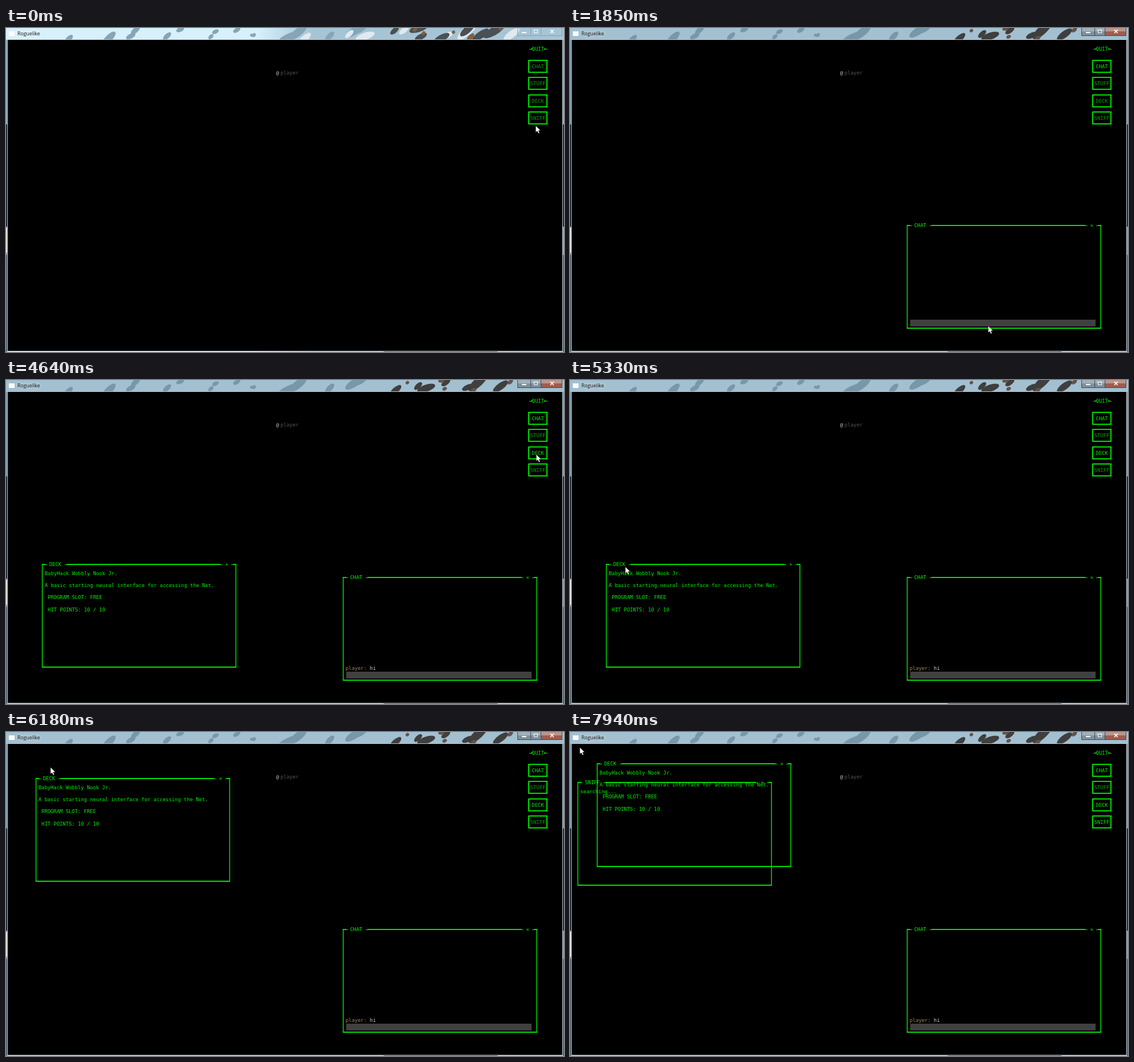
These frames come from a looping animation (981 by 571 pixels, 8 s). An HTML page with a canvas:

```html
<!DOCTYPE html>
<html lang="en">
<head>
<meta charset="utf-8">
<title>Roguelike</title>
<style>
  html, body { margin: 0; width: 100%; height: 100%; overflow: hidden; background: #000; }
  canvas { display: block; }
</style>
</head>
<body>
<canvas id="stage" width="981" height="571"></canvas>
<script>
const ctx = document.getElementById('stage').getContext('2d');
const W = 981, H = 571, LOOP = 8000, TICK = 77.05;
const CELL_W = 16 / 3, CELL_H = 32 / 3;
const GREEN = '#00e000', BRIGHT = '#00f000', DIM = '#00a400';
const MONO = '8.86px "DejaVu Sans Mono", monospace';

// Ticks at which things happen
const CHAT_OPEN = 8, TYPING = 36, SENT = 45, DECK_OPEN = 60, SNIFF_OPEN = 93;

// Moves: start tick, end tick, goal x, goal y
const pointerMoves = [
  [0, 4, 943, 67], [9, 13, 722, 575], [15, 25, 735, 524], [46, 59, 932, 131],
  [60, 68, 94, 329], [68, 72, 117, 329], [74, 76, 93, 275], [76, 80, 78, 62],
  [81, 85, 641, 124], [85, 86, 885, 314], [88, 93, 938, 155], [94, 100, 58, 11],
  [100, 101, 20, -30], [102, 103, 17, 27]
];
const deckMoves = [[74, 75, 95, 324], [76, 81, 47, 56]];

const ease = f => (1 - Math.cos(Math.PI * f)) / 2;

function place(x, y, moves, tick) {
  for (const [from, to, gx, gy] of moves) {
    if (tick <= from) break;
    const f = ease(Math.min(1, (tick - from) / (to - from)));
    x += (gx - x) * f;
    y += (gy - y) * f;
  }
  return [Math.round(x), Math.round(y)];
}

function seeded(seed) {
  return () => (seed = seed * 16807 % 2147483647) / 2147483647;
}

function rect(color, x, y, w, h) {
  ctx.fillStyle = color;
  ctx.fillRect(x, y, w, h);
}

function text(str, x, y, color = BRIGHT, font = MONO) {
  ctx.font = font;
  ctx.fillStyle = color;
  ctx.fillText(str, x, y);
}

// Slanted flecks spread over the title bar
function flecks(rand, color, count, from, to, size) {
  ctx.fillStyle = color;
  for (let i = 0; i < count; i++) {
    const x = from + (to - from) * (i + rand()) / count;
    const r = size * (.5 + rand());
    ctx.beginPath();
    ctx.ellipse(x, rand() * 20, r, 2 + r * .25, -.3 - rand() * .6, 0, Math.PI * 2);
    ctx.fill();
  }
}

// Blurred wallpaper seen through the window frame
function wallpaper(active) {
  const rand = seeded(41);
  const slate = active ? '#7897a9' : '#86a5b7';
  const dark = active ? '#403f3f' : '#4b5054';
  const brown = active ? '#65534d' : '#80603f';
  const base = ctx.createLinearGradient(0, 0, W, 0);
  base.addColorStop(.45, active ? '#a2c0d0' : '#d8f0fc');
  base.addColorStop(.55, active ? '#a2c0d0' : '#a5c4d5');
  rect(base, 0, 0, W, H);

  flecks(rand, slate, 6, 110, 340, 11);
  flecks(rand, slate, 5, 345, 455, 5);
  flecks(rand, slate, 5, 470, 650, 14);
  if (!active) flecks(rand, '#dfe9ee', 7, 500, 890, 18);
  flecks(rand, dark, 7, 672, 870, 17);
  flecks(rand, brown, 5, 690, 890, 6);

  // Side and bottom edges
  for (const x of [0, 979]) {
    rect(slate, x, 21, 2, H);
    rect('#14232e', x, 170, 2, 180);
    rect('#4c626f', x, 400, 2, 170);
  }
  rect('#dedddc', 0, 352, 2, 44);
  rect(dark, 664, 570, 200, 1);
}

function titleBar(active) {
  ctx.save();
  ctx.shadowColor = '#fff';
  ctx.shadowBlur = 7;
  text('Roguelike', 20, 13, '#111', '8.8px "Open Sans", sans-serif');
  ctx.restore();
  rect('#fff', 5, 6, 10, 8);

  if (active) {
    rect('#9fb0bb', 900, 0, 40, 13);
    rect('#7d909d', 900, 6, 40, 7);
    rect('#bd9589', 940, 0, 37, 6);
    rect('#a15b4c', 940, 6, 37, 7);
  }
  ctx.lineWidth = 1;
  ctx.strokeStyle = active ? '#3d4a53' : '#8ba0ad';
  for (const [x, w] of [[899.5, 23], [922.5, 18], [940.5, 37]]) ctx.strokeRect(x, -1, w, 14.5);

  rect('#fff', 907, 7, 8, 2);
  ctx.strokeStyle = '#fff';
  ctx.strokeRect(928.5, 3.5, 6, 5);
  ctx.lineWidth = 1.7;
  ctx.beginPath();
  ctx.moveTo(957, 3); ctx.lineTo(963, 9);
  ctx.moveTo(963, 3); ctx.lineTo(957, 9);
  ctx.stroke();

  rect('#b4cad6', 2, 20, 977, 550);
  rect('#000', 3, 21, 975, 548);
}

function button(label, row, open) {
  const y = Math.round(57 + row * 30.4);
  ctx.strokeStyle = GREEN;
  ctx.lineWidth = 2;
  ctx.strokeRect(919, y, 32, 21);
  text(label, 935 - label.length * CELL_W / 2, y + 14.2, open ? BRIGHT : DIM);
}

// Horizontal bar whose ends thin out where asked
function bar(x, y, w, thinLeft, thinRight) {
  rect(GREEN, x, y, w, 1);
  rect(GREEN, x + thinLeft, y - 1, w - thinLeft - thinRight, 2);
}

function panel(title, x, y) {
  const start = 19 + title.length * CELL_W;
  bar(x, y, 9, 0, 3);
  bar(x + start, y, 317 - start, 3, 3);
  bar(x + 333, y, 9, 3, 0);
  rect(GREEN, x, y, 1.5, 181);
  rect(GREEN, x + 340.5, y, 1.5, 181);
  rect(GREEN, x, y + 180, 342, 2);
  text(title, x + 13, y + 3.4);
  text('×', x + 322.5, y + 3.4);
}

function line(str, x, y, row, color) {
  text(str, x + 5, y + 8 + row * CELL_H, color);
}

function chat(tick) {
  const x = 592, y = 348;
  panel('CHAT', x, y);
  rect('#404040', 598, 514, 326, 12);
  if (tick >= SENT) {
    line('player:', x, y, 14.5, '#a58155');
    line('        hi', x, y, 14.5, '#d0d0d0');
  } else if (tick >= TYPING) {
    line('hi'.slice(0, tick - TYPING + 1), x, y, 15.75, '#d8d8d8');
  }
}

function deck(tick) {
  const [x, y] = place(63, 325, deckMoves, tick);
  panel('DECK', x, y);
  line('BabyHack Wobbly Nook Jr.', x, y, 1);
  line('A basic starting neural interface for accessing the Net.', x, y, 3);
  line(' PROGRAM SLOT: FREE', x, y, 5);
  line(' HIT POINTS: 10 / 10', x, y, 7);
}

function sniff() {
  panel('SNIFF', 13, 89);
  line('searching...', 13, 89, 1);
}

function pointer(tick) {
  const [x, y] = place(931, 172, pointerMoves, tick);
  ctx.save();
  ctx.translate(x + .3, y + .3);
  const shape = new Path2D('M0 0V11.5L2.7 9.2L4.6 13.4L6.5 12.6L4.7 8.5L8.3 8.2Z');
  ctx.fillStyle = '#fff';
  ctx.fill(shape);
  ctx.strokeStyle = 'rgba(0,0,0,.55)';
  ctx.lineWidth = .6;
  ctx.stroke(shape);
  ctx.restore();
}

function draw(ms) {
  const tick = Math.floor((ms % LOOP + 8) / TICK);
  const active = tick >= CHAT_OPEN;
  wallpaper(active);
  titleBar(active);

  text('@', 474.8, 82, '#c8c8c8');
  text('player', 482.4, 82, '#555');
  text('QUIT', 924.6, 40.4);
  bar(920, 37, 5, 3, 0);
  bar(946, 37, 6, 0, 3);
  button('CHAT', 0, active);
  button('STUFF', 1, false);
  button('DECK', 2, tick >= DECK_OPEN);
  button('SNIFF', 3, tick >= SNIFF_OPEN);

  if (active) chat(tick);
  if (tick >= DECK_OPEN) deck(tick);
  if (tick >= SNIFF_OPEN) sniff();
  pointer(tick);
}

const begin = performance.now();
function loop() {
  draw(performance.now() - begin);
  requestAnimationFrame(loop);
}
loop();
</script>
</body>
</html>
```
